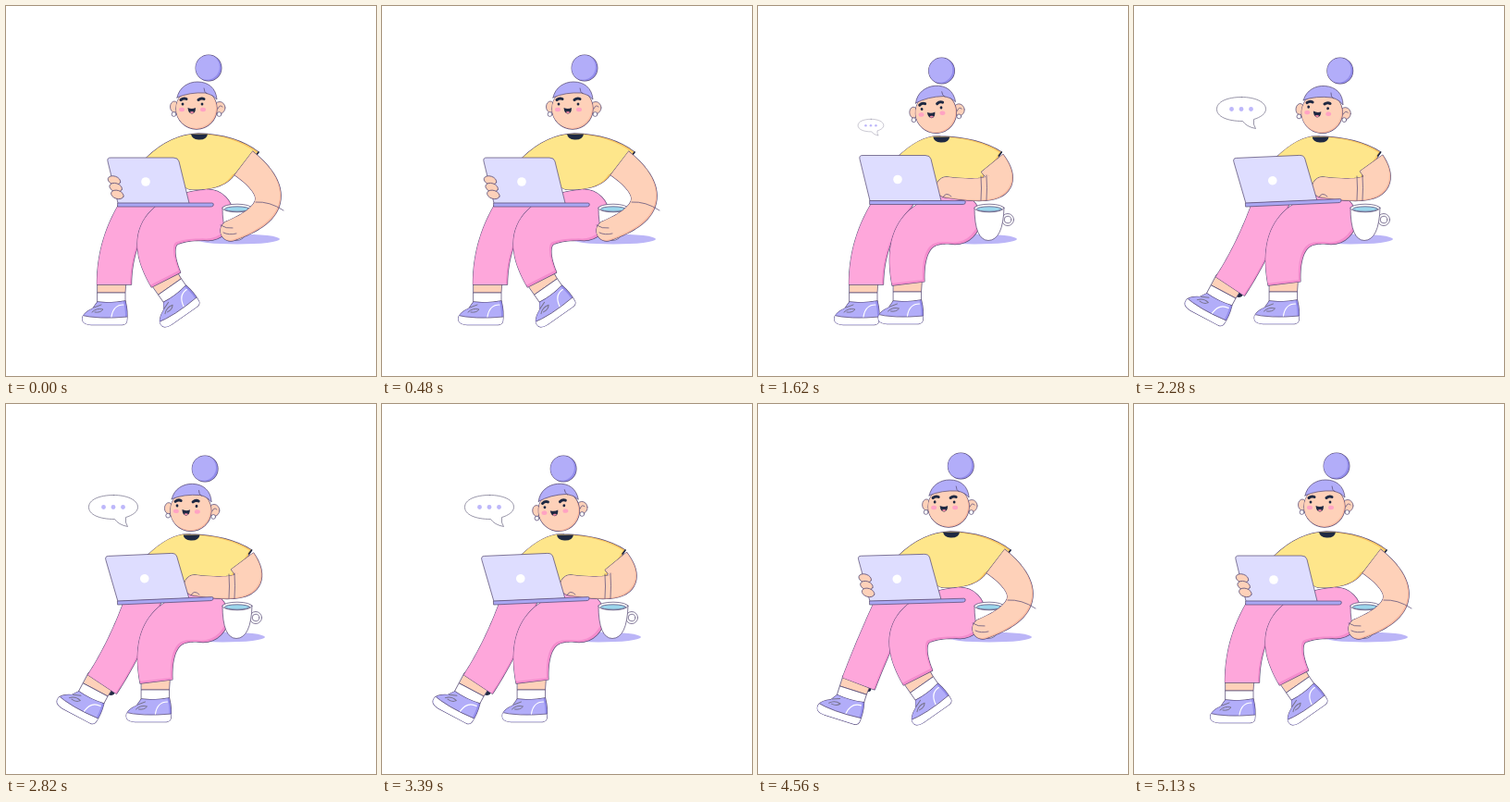
An HTML page with a canvas for the animation above (5160 ms loop, 400 by 400 pixels).

```html
<!DOCTYPE html>
<html lang="en">
<head>
<meta charset="utf-8">
<title>Working with a laptop</title>
<style>
html, body { margin: 0; width: 100%; height: 100%; overflow: hidden; background: #fff; }
canvas { display: block; }
</style>
</head>
<body>
<canvas id="stage" width="400" height="400"></canvas>
<script>
const c = document.getElementById('stage').getContext('2d');
const LOOP = 5160, TAU = Math.PI * 2;
const INK = '#5b4f78', DARK = '#1f2942', SKIN = '#fed1b9', SKIN_SHADE = '#f9b9a0';
const LILAC = '#b2adf9', LILAC_SHADE = '#928ceb', PINK = '#fea7db', PINK_SHADE = '#f48ccd';
const SIDES = [-1, 1];

const mix = (a, b, k) => a + (b - a) * k;
const mixPoint = (a, b, k) => [mix(a[0], b[0], k), mix(a[1], b[1], k)];
const clamp = x => Math.max(0, Math.min(1, x));
const ramp = (t, a, b) => {
  const x = clamp((t - a) / (b - a));
  return x * x * (3 - 2 * x);
};

function ellipse(x, y, rx, ry = rx) {
  const p = new Path2D();
  p.ellipse(x, y, rx, ry, 0, 0, TAU);
  return p;
}

// Tapered tube along a quadratic curve, with a round cap at one end
function limb(from, bend, to, w0, w1, cap) {
  const path = new Path2D(), near = [], far = [], steps = 30;
  for (let i = 0; i <= steps; i++) {
    const k = i / steps, a = mixPoint(from, bend, k), b = mixPoint(bend, to, k);
    const [x, y] = mixPoint(a, b, k), w = mix(w0, w1, k);
    const angle = Math.atan2(b[1] - a[1], b[0] - a[0]);
    const nx = -Math.sin(angle) * w, ny = Math.cos(angle) * w;
    near.push([x + nx, y + ny]);
    far.unshift([x - nx, y - ny]);
  }
  for (const p of [...near, ...far]) path.lineTo(...p);
  path.closePath();
  const [x, y] = cap === 'start' ? from : to, r = cap === 'start' ? w0 : w1;
  path.moveTo(x + r, y);
  path.arc(x, y, r, 0, TAU, true);
  return path;
}

function stroke(p, color = INK, width = 0.75) {
  c.strokeStyle = color;
  c.lineWidth = width;
  c.stroke(typeof p === 'string' ? new Path2D(p) : p);
}

function shape(p, fill, line = INK) {
  if (typeof p === 'string') p = new Path2D(p);
  c.fillStyle = fill;
  c.fill(p);
  if (line) stroke(p, line);
}

// Outline, then a fill whose uncovered rim shows the shade
function shaded(p, fill, shade, dx, dy) {
  if (typeof p === 'string') p = new Path2D(p);
  stroke(p, INK, 1.3);
  shape(p, shade, null);
  c.save();
  c.clip(p);
  c.translate(dx, dy);
  shape(p, fill, null);
  c.restore();
}

function placed(x, y, deg, draw) {
  c.save();
  c.translate(x, y);
  c.rotate(deg * Math.PI / 180);
  draw();
  c.restore();
}

function foot(x, y, deg, hole = 0) {
  const shoe = new Path2D('M-15 19Q0 21 15 18Q18 30 16.500 40Q16 43 12 43.500H-22Q-33 43 -31 35Q-29 30-20 26Z');
  placed(x, y, deg, () => {
    if (hole) shape(ellipse(15, 3, 5 * hole, 4 * hole), DARK, null);
    shape('M-15-4H16L15 9H-15Z', SKIN);
    shape('M-15 9H15V20H-15Z', '#fff');
    shaded(shoe, LILAC, LILAC_SHADE, -2, 0);
    c.save();
    c.clip(shoe);
    shape('M-34 33Q-15 38 18 35V46H-34Z', '#fff');
    c.restore();
    stroke('M13 22Q2 22 0 35', '#fff', 1.2);
    stroke('M-19 25L-11 22M-21 30Q-16 25-9 27Q-12 31-18 30', '#77738c', 1);
  });
}

function legs(pose, kick) {
  const leftCuff = mixPoint([117, 301], [104, 303], kick);
  const rightCuff = mixPoint([173, 296], [162.5, 300], pose);
  foot(leftCuff[0] - 3, leftCuff[1] - 2 * kick, 28 * kick, kick);
  foot(rightCuff[0] - 1, rightCuff[1], -35 * (1 - pose));
  const left = limb([150, 207], mixPoint([117, 250], [131, 262], kick), leftCuff, 19, 18.5, 'start');
  const right = limb(mixPoint([218, 226], [213, 230], pose),
    mixPoint([139, 229], [154, 230], pose), rightCuff, 27.5, 17.5, 'start');
  shaded(left, PINK, PINK_SHADE, -1.5, 0);
  shaded(right, PINK, PINK_SHADE, -2, -2);
}

function shirt(pose) {
  const neckX = 208 - 9 * pose, neckY = 138 + 3 * pose, tip = 273 - 8 * pose;
  shaded(`M152 164Q178 139 ${neckX} ${neckY}Q${tip - 25} ${neckY + 1} ${tip} 158
    Q${tip - 10} 175 247 182Q236 200 198 ${198 + 4 * pose}L170 185Z`, '#fee68b', '#fbc765', -2.5, 0.5);
  shape(`M${neckX - 8} ${neckY + 0.5}H${neckX + 10}Q${neckX + 9} ${neckY + 7} ${neckX} ${neckY + 6.5}
    Q${neckX - 7} ${neckY + 6} ${neckX - 8} ${neckY + 0.5}`, DARK, null);
  stroke(`M${tip} 158L${tip - 3} 162`, DARK, 1.6);
}

function cup() {
  shape(ellipse(270, 231, 6.5), '#fff');
  shape(ellipse(270, 231, 3.8), '#fff');
  shape('M234 218Q234 253 249 253.500Q265 253 266 218Z', '#fff');
  shape(ellipse(250, 218.5, 16, 4.3), '#fff');
  shape(ellipse(250, 219.5, 13.5, 2.7), '#9bd6ec');
}

function arm(pose, shift) {
  shaded(limb([257 - 2 * pose + shift, 170], mixPoint([316, 215], [283, 207], pose),
    mixPoint([243, 243], [204, 196], pose), 16 - pose, 11, 'end'), SKIN, SKIN_SHADE, -1.2, -1);
  const inner = mixPoint([270, 212], [241, 184], pose);
  const outer = mixPoint([300, 221], [241, 210], pose);
  stroke(`M${inner}Q${mix(285, 242, pose)} ${mix(211, 197, pose)} ${outer}`);
  c.globalAlpha = clamp(1 - pose * 3);
  stroke('M232 237Q238 241 245 240M235 245Q241 248 249 246');
  c.globalAlpha = clamp(pose * 3 - 2);
  stroke('M247 183Q248 197 247 210M200 207Q203 200 209 206');
  c.globalAlpha = 1;
}

function fingers(dx) {
  for (let i = 0; i < 3; i++)
    placed(117 + 1.7 * i + dx, 188.5 + 7.7 * i, 18, () => shape(ellipse(0, 0, 7, 4.5), SKIN));
}

function laptop(dy, deg) {
  placed(121, 217 + dy, deg, () => {
    shape('M0-4L-11-49Q-12-53-8-53H60Q65-53 66-49L77-4Z', '#deddff');
    shape('M0-4H102Q104-4 103-1Q102 0 100 0H0Z', '#aaa7f3');
    shape(ellipse(30, -27, 4.8), '#fff', null);
  });
}

function head(x, y, deg) {
  placed(x, y, deg, () => {
    shape(ellipse(-24, -1, 4.5, 6), SKIN);
    shape(ellipse(25, 0, 6, 6.5), SKIN);
    stroke('M23 1Q25-4 28-1');
    for (const side of SIDES) shape(ellipse(24.5 * side, 7, 2.4), '#fff');
    shaded(ellipse(0, 1, 22), SKIN, SKIN_SHADE, -1, -1);
    shape('M-21-11C-19-22-9-28 1-28C13-28 21-21 22-9Q18-14 10-16Q-8-17-21-11Z', LILAC);
    stroke('M8-21Q8-17 11-15');
    for (const side of SIDES) {
      const fx = -4.5 + 9.5 * side;
      stroke(`M${fx - 3} -8.500Q${fx} -11 ${fx + 3} -9.500`, DARK, 3);
      shape(ellipse(fx + side, -4, 1.4, 1.6), DARK, null);
      shape(ellipse(fx + 2 * side, 2, 3, 2.2), '#ffa3c3', null);
    }
    shape('M-9.500 0Q-5 2-1 0Q-1 6-5 6.500Q-9 6-9.500 0Z', DARK, null);
    shape(ellipse(-5, 5, 2, 1), '#f28aa5', null);
  });
}

function bubble(size) {
  if (size <= 0) return;
  c.save();
  c.translate(128.5, 148.5);
  c.scale(size, size);
  shape('M-12-50C2-50 14-45 14-37C14-32 8-28 1-26Q0-20 3-16Q-7-18-11-24' +
    'C-28-24-39-29-39-37C-39-45-28-50-12-50Z', '#fff', '#77738c');
  for (let i = -1; i < 2; i++) shape(ellipse(-12.5 + 10.5 * i, -37, 2.4), '#bdb7fa', null);
  c.restore();
}

function draw(t) {
  const pose = ramp(t, 1130, 1560) - ramp(t, 3640, 4030); // 0 holds the cup, 1 types
  const kick = ramp(t, 1660, 2150) - ramp(t, 4380, 4820); // left leg stretched out
  const swing = ramp(t, 900, 1900) - ramp(t, 4100, 4700);
  const sway = -7 * swing * Math.cos((t - 1620) / 1700 * TAU);
  const headX = 206 - 8 * pose + sway, shift = sway * 0.3;

  c.clearRect(0, 0, 400, 400);
  c.lineCap = c.lineJoin = 'round';
  shape(ellipse(mix(250, 234, pose), 252, 46, 5.5), '#bbb5f7', null);
  legs(pose, kick);
  placed(shift, 0, 0, () => shirt(pose));
  cup();
  arm(pose, shift);

  const gripping = t < 1140 || t > 4160;
  if (!gripping) fingers(mix(-2, 14, pose));
  laptop(-2.5 * pose * (1 - kick), -2.5 * kick);
  if (gripping) fingers(-2 * kick);

  shaded(ellipse(219 - 8 * pose + 2.2 * sway, 67 + 3 * pose, 13.8), LILAC, LILAC_SHADE, -2, -1);
  head(headX, 110 + 4.3 * pose, 0.8 * sway);
  bubble(1 - (1 - clamp((t - 1540) / 370)) ** 3 - ramp(t, 3450, 3720));
}

const start = performance.now();
function tick() {
  draw((performance.now() - start) % LOOP);
  requestAnimationFrame(tick);
}
tick();
</script>
</body>
</html>
```
